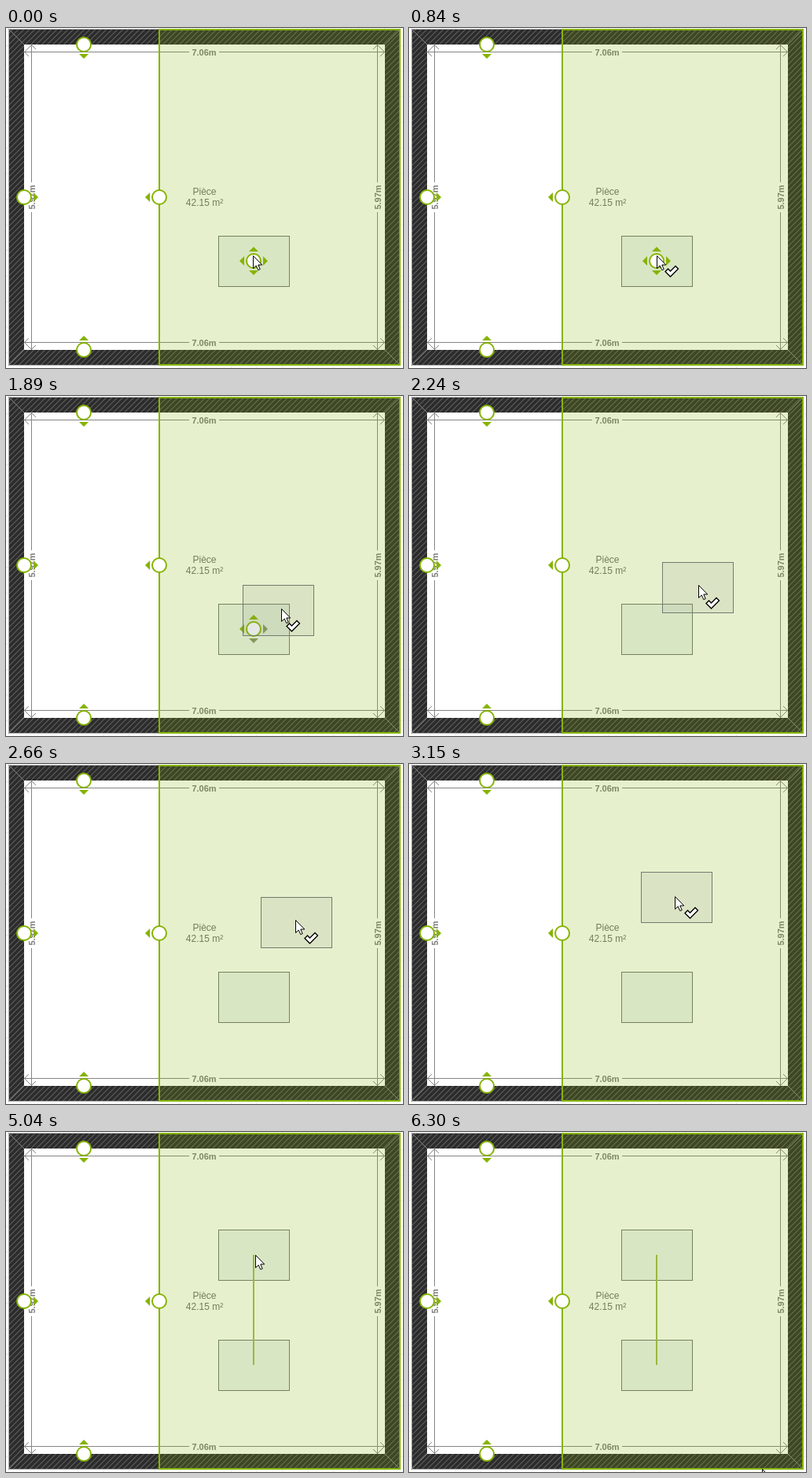
These frames come from a looping animation (505 by 432 pixels, 6.72 s). An HTML page:

```html
<!DOCTYPE html>
<html lang="fr">
<head>
<meta charset="utf-8">
<style>
  html, body { margin: 0; width: 100%; height: 100%; overflow: hidden; background: #fff; }
  svg { display: block; width: 505px; height: 432px; }
  text { font-family: "Liberation Sans", Arial, sans-serif; text-anchor: middle; fill: #6f6f6f; }
  .size { font-size: 11px; font-weight: bold; fill: #7c7c7c; }
  .room { font-size: 12px; }
  .line { fill: none; stroke: #858585; }
  .box { fill: rgba(130, 160, 140, .13); stroke: #76825e; }
  .ghost { fill: rgba(128, 138, 140, .12); stroke: #747a72; }
  .pointer { fill: #fff; stroke: #000; }
  .knob { fill: #fff; stroke: #86b300; stroke-width: 2; }
  .tri { fill: #86b300; }
  .dim .knob { fill: #f2f5f0; }
  .dim .side { fill: #86975c; }
</style>
</head>
<body>
<svg viewBox="0 0 505 432">
  <defs>
    <pattern id="hatch" width="4.95" height="4.95" patternUnits="userSpaceOnUse" patternTransform="rotate(45)">
      <path d="M0 0h5v5h-5z" fill="#2c2c2c"/>
      <path d="M2.5 0v5" stroke="#666"/>
    </pattern>
    <pattern id="grid" x="26" y="22" width="32.5" height="32.5" patternUnits="userSpaceOnUse">
      <path d="M.5 0v32.5M0 .5h32.5" stroke="#e9ebef"/>
    </pattern>
    <path id="tri" d="M-6 -12h12l-6 -6z"/>
    <circle id="knob" r="9"/>
    <rect id="box" x=".5" y=".5" width="90" height="64"/>
    <g id="across">
      <path class="line" d="M23 .5H482M29 -5L23.5 .5L29 6M476 -5L481.5 .5L476 6"/>
      <path d="M233 -6h38v13h-38z" fill="#fff"/>
      <text class="size" x="252" y="5">7.06m</text>
    </g>
    <g id="down">
      <path class="line" d="M.5 21V409M-5 27L.5 21.5L6 27M-5 403L.5 408.5L6 403"/>
      <path d="M-6 196h13v38h-13z" fill="#fff"/>
      <text class="size" transform="translate(5 215) rotate(-90)">5.97m</text>
    </g>
  </defs>

  <path d="M0 0h505v432h-505z" fill="url(#grid)"/>
  <path d="M3.5 1.5h498v427h-498z" fill="url(#hatch)" stroke="#aaa"/>
  <path class="line" d="M3 1L23 21M502 1L482 21M3 429L23 409M502 429L482 409"/>
  <path d="M23 21h459v388h-459z" fill="#fff"/>
  <use href="#across" y="30"/>
  <use href="#across" y="399"/>
  <use href="#down" x="32"/>
  <use href="#down" x="472"/>
  <text class="room" x="252.5" y="212">Pièce</text>
  <text class="room" x="252.5" y="226">42.15 m²</text>
  <path d="M195 2h306v426h-306z" fill="#82b300" fill-opacity=".2" stroke="#86b300" stroke-width="2"/>

  <g transform="translate(99 21)"><use href="#knob" class="knob"/><use href="#tri" class="tri" transform="rotate(180)"/></g>
  <g transform="translate(99 409)"><use href="#knob" class="knob"/><use href="#tri" class="tri"/></g>
  <g transform="translate(23 215)"><use href="#knob" class="knob"/><use href="#tri" class="tri" transform="rotate(90)"/></g>
  <g transform="translate(195 215)"><use href="#knob" class="knob"/><use href="#tri" class="tri" transform="rotate(-90)"/></g>

  <use href="#box" class="box" x="270" y="264"/>
  <g id="handle" transform="translate(315 296)">
    <use href="#knob" class="knob"/>
    <use href="#tri" class="tri"/>
    <use href="#tri" class="tri side" transform="rotate(90)"/>
    <use href="#tri" class="tri side" transform="rotate(180)"/>
    <use href="#tri" class="tri" transform="rotate(270)"/>
  </g>
  <use href="#box" id="copy"/>
  <path id="link" d="M315 156V296" stroke="#9ab83f" stroke-width="2"/>
  <path id="check" class="pointer" stroke-width="1.4" d="M11 20.5L14.5 17L17.5 20L24 13.5L27.5 17L17.5 27Z"/>
  <path id="cursor" class="pointer" d="M.5 .5V16.5L4.2 13L6.8 18.6L9.2 17.6L6.8 12H11.8Z"/>
</svg>
<script>
const LOOP = 6720, STEP = 70;
const GRAB = 840, DRAG = 1330, DIM = 1610, LEAVE = 2030, STOP = 4130, SNAP = 4270, DROP = 5040, EXIT = 5880, GONE = 6300;
// time, left and top of the dragged copy
const keys = [
  [1330, 270, 257], [1890, 301, 240], [1960, 309, 236], [2450, 326, 190],
  [2660, 324, 169], [3360, 285, 130], [3710, 280, 126], [4060, 275, 124], [4130, 274, 124]
];
const el = id => document.getElementById(id);
const show = (id, on) => el(id).setAttribute('visibility', on ? 'visible' : 'hidden');
const place = (id, x, y) => el(id).setAttribute('transform', `translate(${Math.round(x)} ${Math.round(y)})`);

const slope = (i, axis) => (keys[i + 1][axis] - keys[i][axis]) / (keys[i + 1][0] - keys[i][0]);

// Monotone tangent: flat wherever the direction turns
function tangent(i, axis) {
  if (i === 0 || i === keys.length - 1) return 0;
  const a = slope(i - 1, axis), b = slope(i, axis);
  return a * b > 0 ? 2 * a * b / (a + b) : 0;
}

function along(time, axis) {
  const t = Math.min(Math.max(time, DRAG), STOP);
  let i = 0;
  while (i < keys.length - 2 && t > keys[i + 1][0]) i++;
  const h = keys[i + 1][0] - keys[i][0], u = (t - keys[i][0]) / h, v = 1 - u;
  return keys[i][axis] * v * v * (1 + 2 * u) + keys[i + 1][axis] * u * u * (3 - 2 * u)
    + h * u * v * (v * tangent(i, axis) - u * tangent(i + 1, axis));
}

// The pointer runs slightly ahead of the box it drags
function cursorAt(t) {
  if (t < GRAB) return [314, 289];
  if (t < STOP) return [along(t + STEP / 2, 1) + 45, along(t + STEP / 2, 2) + 32];
  const p = Math.min(Math.max((t - EXIT + STEP) / (GONE - EXIT + STEP), 0), 1) ** 1.5;
  return [317 + 132 * p, 156 + 272 * p];
}

function draw(now) {
  const t = Math.floor(now % LOOP / STEP) * STEP;
  const x = t < SNAP ? along(t, 1) : 270, y = along(t, 2);
  show('handle', t < LEAVE);
  show('copy', t >= DRAG);
  show('link', t >= SNAP);
  show('check', t >= GRAB && t < DROP);
  el('handle').setAttribute('class', t < DIM ? '' : 'dim');
  el('copy').setAttribute('class', t < DROP ? 'ghost' : 'box');
  place('copy', x, y);
  place('check', x + 45, y + 32);
  place('cursor', ...cursorAt(t));
}

const start = performance.now();
function tick() {
  draw(performance.now() - start);
  requestAnimationFrame(tick);
}
tick();
</script>
</body>
</html>
```
